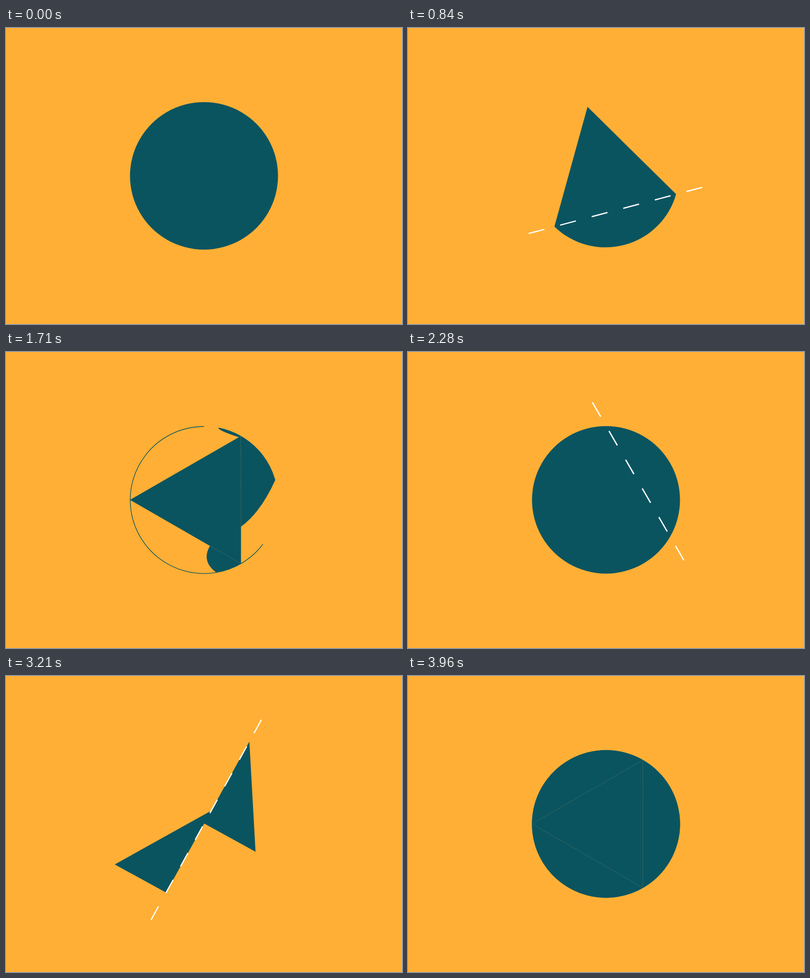
An HTML page for the animation above (3.99 s loop, 800x600 px).

```html
<!DOCTYPE html>
<html lang="en">
<head>
<meta charset="utf-8">
<title>Fold, cut, pour</title>
<style>
  html, body { margin: 0; width: 100%; height: 100%; overflow: hidden; background: #ffaf35; }
  svg { display: block; width: 100vw; height: 100vh; }
</style>
</head>
<body>
<svg viewBox="0 0 800 600">
  <circle id="ring" cx="400" cy="300" r="149" fill="none" stroke="#0a5460" stroke-width="1.3"
    pathLength="360" transform="rotate(37 400 300)"/>
  <g id="paper" fill="#0a5460">
    <path id="body"/>
    <path id="liquid"/>
    <line id="guide" stroke="#fff" stroke-width="2.6"/>
  </g>
</svg>
<script>
const LOOP = 3990, CYCLE = 2040, STEP = 30, REST = 1950;
const R = 149.5;
const $ = id => document.getElementById(id);
const clamp = (x, a = 0, b = 1) => Math.min(b, Math.max(a, x));
const mix = (a, b, k) => a + (b - a) * k;
const smooth = (t, a, b) => {
  const k = clamp((t - a) / (b - a));
  return k * k * (3 - 2 * k);
};

// Monotone cubic curve through [time, value] keys.
function curve(...keys) {
  const slope = keys.slice(1).map((k, i) => (k[1] - keys[i][1]) / (k[0] - keys[i][0]));
  const tangent = keys.map((_, i) => {
    const a = slope[i - 1] || 0, b = slope[i] || 0;
    return a * b > 0 ? 2 * a * b / (a + b) : 0;
  });
  return t => {
    if (t <= keys[0][0]) return keys[0][1];
    const i = keys.findIndex(k => k[0] > t) - 1;
    if (i < 0) return keys[keys.length - 1][1];
    const [t0, v0] = keys[i], [t1, v1] = keys[i + 1];
    const h = t1 - t0, u = (t - t0) / h, w = 1 - u;
    return v0 * w * w * (1 + 2 * u) + v1 * u * u * (3 - 2 * u)
      + h * u * w * (tangent[i] * w - tangent[i + 1] * u);
  };
}

const turn = curve([330, 0], [480, 21.2], [600, 17], [780, -15.3], [900, -14],
  [1170, 28.8], [1310, 35.4], [1470, 39.6], [1710, 30]);
const squash = curve([330, 1], [480, .847], [600, .87], [780, .963], [900, .97],
  [1170, .845], [1290, 1]);
const slide = curve([1130, 0], [1170, 189], [1300, 383], [1470, 38], [1530, 0]);
const ringSweep = curve([1455, 0], [1470, 4], [1710, 233], [1860, 360]);

const polar = deg => [R * Math.cos(deg * Math.PI / 180), R * Math.sin(deg * Math.PI / 180)];
const pt = p => p[0].toFixed(2) + " " + p[1].toFixed(2);
const poly = (...pts) => "M" + pts.map(pt).join("L") + "Z";
const TOP = -90, RIGHT = 30, LEFT = 150;
const [A, B, C] = [TOP, RIGHT, LEFT].map(polar);

// Flaps in folding order: start corner and time span of the fold.
const flaps = [
  { from: TOP, start: 290, end: 430 },
  { from: LEFT, start: 660, end: 765 },
  { from: RIGHT, start: 890, end: 1000 }
];

// Dashed guides in paper space: tilt, distance from centre, ends, visible span.
const guides = [
  { tilt: 60, off: 75, a: -185, b: 185, dash: 33.6, on: 45, off2: 330 },
  { tilt: -60, off: 75, a: -185, b: 185, dash: 33.6, on: 585, off2: 720 },
  { tilt: 180, off: 75, a: -185, b: 185, dash: 33.6, on: 795, off2: 930 },
  { tilt: 90, off: 0, a: -285, b: 263, dash: 36.5, on: 1110, off2: 1260 }
];

const pours = [
  { from: TOP, dir: 1, rim: curve([1560, 0], [1710, .37], [1890, 1]), edge: curve([1560, 0], [1710, .71], [1830, 1]) },
  { from: RIGHT, dir: 1, rim: curve([1620, 0], [1710, .17], [1890, 1]), edge: curve([1620, 0], [1710, .28], [1890, 1]) },
  { from: TOP, dir: -1, rim: curve([1650, 0], [1710, .155], [1890, 1]), edge: curve([1650, 0], [1710, .02], [1900, 1]) }
];

function flapPath({ from, start, end }, t) {
  const open = 1 - smooth(t, start, end);
  if (open < .01) return "";
  return `M${pt(polar(from))}A${R} ${R * open} ${from + 150} 0 1 ${pt(polar(from + 120))}Z`;
}

function pourPath({ from, dir, rim, edge }, t) {
  const p = rim(t), q = edge(t);
  if (p <= 0) return "";
  const start = polar(from), corner = polar(from + dir * 120);
  const angle = from + dir * 120 * p;
  const front = polar(angle);
  const back = start.map((v, i) => mix(v, corner[i], q));
  const push = polar(angle + dir * 90).map(v => v / R * 30 * (1 - p));
  const bend = front.map((v, i) => (v + back[i]) / 2 + push[i]);
  return `M${pt(start)}A${R} ${R} 0 0 ${dir > 0 ? 1 : 0} ${pt(front)}Q${pt(bend)} ${pt(back)}Z`;
}

function bodyPath(t) {
  const d = slide(t);
  if (d < .1) return poly(A, B, C) + flaps.map(f => flapPath(f, t)).join("");
  const shift = (dy, ...pts) => poly(...pts.map(([x, y]) => [x, y + dy]));
  const mid = [0, R / 2];
  return shift(.6 * d, A, mid, C) + shift(-.4 * d, A, B, mid);
}

function drawGuide(t) {
  const line = $("guide");
  const g = guides.find(g => t > g.on && t < g.off2);
  line.style.display = g ? "" : "none";
  if (!g) return;
  const attrs = {
    x1: g.a, x2: g.b, y1: -g.off, y2: -g.off,
    transform: `rotate(${g.tilt})`,
    "stroke-dasharray": g.dash,
    opacity: smooth(t, g.on, g.on + 45) * (1 - smooth(t, g.off2 - 75, g.off2))
  };
  for (const name in attrs) line.setAttribute(name, attrs[name]);
}

function draw(now) {
  const phase = Math.floor(now % LOOP / STEP) * STEP % CYCLE;
  const t = phase >= REST ? 0 : phase;
  const sy = squash(t), sx = 1 - .55 * (1 - sy);
  $("paper").setAttribute("transform",
    `translate(400 299.7) rotate(${turn(t)}) scale(${sx} ${sy})`);
  $("body").setAttribute("d", bodyPath(t));
  $("liquid").setAttribute("d", pours.map(p => pourPath(p, t)).join(""));
  const sweep = ringSweep(t);
  $("ring").style.display = sweep > 0 ? "" : "none";
  $("ring").setAttribute("stroke-dasharray", sweep >= 360 ? "none" : `${sweep} 360`);
  drawGuide(t);
}

const begin = performance.now();
function tick() {
  draw(performance.now() - begin);
  requestAnimationFrame(tick);
}
tick();
</script>
</body>
</html>
```
